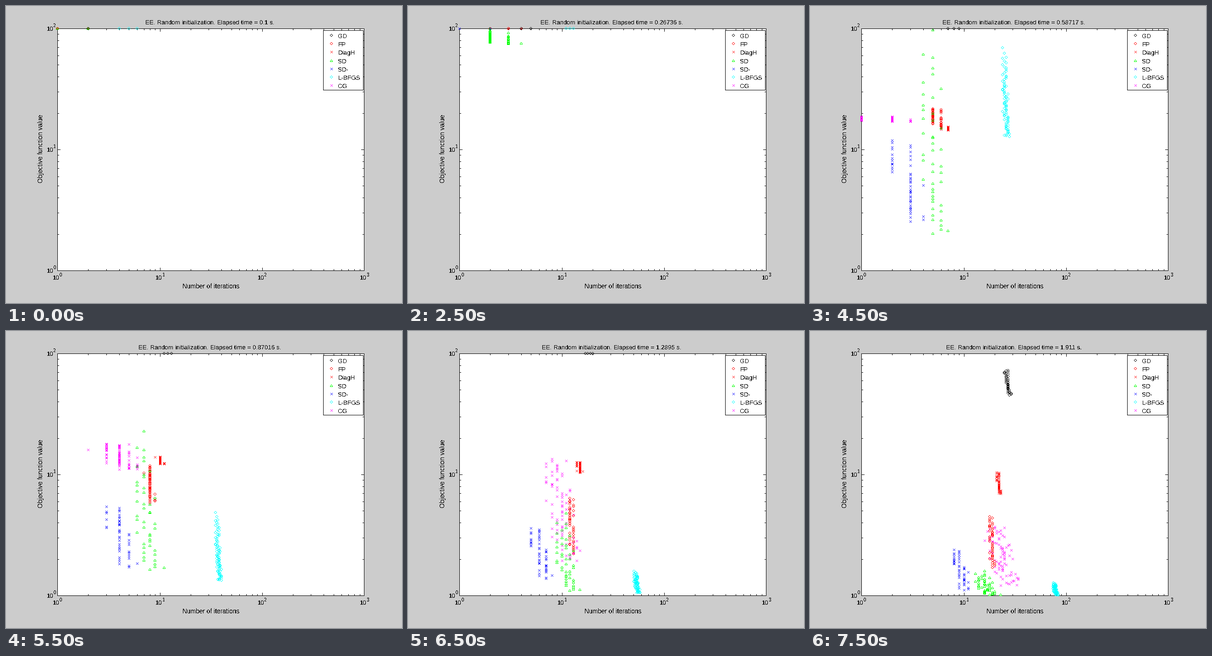
Write a matplotlib script that moves like this. It is 864 by 648 pixels and loops after 8 s.

```python
import numpy as np
import matplotlib.pyplot as plt
from matplotlib.animation import FuncAnimation
from matplotlib.collections import PolyCollection

W, H, DPI = 864, 648, 72
FRAMES, INTERVAL = 16, 500
LEFT, RIGHT, TOP, BOTTOM = 112, 781, 49, 577

plt.rcParams.update({"font.family": "Liberation Sans",
                     "text.antialiased": False})
fig = plt.figure(figsize=(W / DPI, H / DPI), dpi=DPI, facecolor="#cccccc")
ax = fig.add_axes([0, 0, 1, 1])
ax.set_xlim(0, W)
ax.set_ylim(H, 0)
ax.axis("off")


def px(n):
    return np.rint(112.3 + 223.2 * np.log10(n))


def py(v):
    return np.rint(BOTTOM - 264 * np.log10(v))


def box(x, y, w=1, h=1):
    return [(x, y), (x + w, y), (x + w, y + h), (x, y + h)]


def fill(boxes, color, z):
    polys = PolyCollection(boxes, facecolors=color, edgecolors="none",
                           linewidths=0, zorder=z)
    ax.add_collection(polys, autolim=False)
    return polys


def outline(x0, y0, x1, y1):
    w, h = x1 - x0 + 1, y1 - y0 + 1
    return [box(x0, y0, w), box(x0, y1, w),
            box(x0, y0, 1, h), box(x1, y0, 1, h)]


def label(x, y, s, size=13.33, **kw):
    return ax.text(x, y, s, fontsize=size, color="black", zorder=6, **kw)


# Crisp markers, built from unit cells around the centre
def stamp(rule):
    r = range(-3, 3)
    return np.array([box(i, j) for j in r for i in r if rule(i, j)], float)


CIRCLE = stamp(lambda i, j: abs(2 * i + 1) + abs(2 * j + 1) == 6)
CROSS = stamp(lambda i, j: abs(i) == abs(j) < 3)
TRIANGLE = stamp(lambda i, j: j == 2 or
                 (j > -3 and abs(2 * i + 1) == 2 * ((j + 3) // 2) + 1))


def place(marker, x, y):
    at = np.stack([x, y], axis=-1).reshape(-1, 1, 1, 2)
    return (at + marker).reshape(-1, 4, 2)


def elapsed(step):
    return 0.1 * 300 ** (step / 29)


class Series:
    """Runs of one method: iterations grow as a power of the elapsed time,
    values fall within a band given by (step, high, low) keys."""

    def __init__(self, name, marker, color, z, rate, power, spread, keys,
                 runs=45, skew=1, first=0):
        self.name, self.marker, self.color = name, marker, color
        self.rate, self.power, self.spread = rate, power, spread
        self.first = first
        self.steps, high, low = np.array(keys, float).T
        self.high, self.low = np.log(high), np.log(low)
        rng = np.random.default_rng(int(10 * z))
        rank = (np.arange(runs) + rng.random(runs)) / runs
        noise = np.clip(rng.normal(size=runs), -1.8, 1.8)
        self.depth = rank ** (1 / skew)
        self.pace = 0.6 * (2 * rank - 1) * 3 ** 0.5 + 0.8 * noise
        self.cloud = fill([], color, z)

    def draw(self, step):
        if step < self.first:
            self.cloud.set_verts([])
            return
        n = self.rate * elapsed(step) ** self.power
        n = n * np.exp(self.spread * self.pace) + 0.25 * self.pace
        high = np.interp(step, self.steps, self.high)
        low = np.interp(step, self.steps, self.low)
        v = np.exp(high + (low - high) * self.depth)
        x = px(np.maximum(np.rint(n), 1))
        self.cloud.set_verts(place(self.marker, x, py(v)))


series = [
    Series("GD", CIRCLE, "#000000", 3.1, 14.1, 1, 0.02,
           [(13, 100, 100), (15, 73, 45)], runs=36),
    Series("FP", CIRCLE, "#ff0000", 3.2, 9.5, 1.06, 0.02,
           [(5, 100, 100), (9, 21.7, 15.5), (13, 6.4, 2.2), (15, 4.5, 1.7)]),
    Series("DiagH", CROSS, "#ff0000", 3.3, 11.5, 1, 0.01,
           [(5, 100, 100), (9, 15.5, 14.4), (13, 12.7, 10.3),
            (15, 10.5, 6.9)]),
    Series("SD", TRIANGLE, "#00ff00", 3.4, 8.7, 1, 0.12,
           [(4, 100, 100), (5, 100, 75), (7, 98, 4), (9, 98, 1.95),
            (11, 23, 1.6), (13, 4.8, 1.08), (15, 1.6, 1.01)], skew=1.5),
    Series("SD-", CROSS, "#0000ff", 3.5, 4.9, 1, 0.07,
           [(5, 100, 100), (9, 12, 2.5), (11, 5.5, 1.7), (15, 2.4, 1.1)],
           first=2),
    Series("L-BFGS", CIRCLE, "#00ffff", 3.6, 42.5, 0.95, 0.03,
           [(7, 100, 100), (9, 72, 12.7), (11, 5, 1.33), (13, 1.6, 1.05),
            (15, 1.28, 1.01)], runs=80, skew=1.6),
    Series("CG", CROSS, "#ff00ff", 3.0, 5.6, 2.2, 0.16,
           [(9, 18.7, 17), (11, 18, 11), (13, 13.5, 1.9), (15, 3.7, 1.2)],
           runs=80, first=8),
]

# Axes
fill([box(LEFT, TOP, RIGHT - LEFT, BOTTOM - TOP)], "white", 1)
ink = outline(LEFT, TOP, RIGHT, BOTTOM)
for decade in range(3):
    for m in range(1, 10):
        size = 7 if m == 1 else 4
        x = px(m * 10 ** decade)
        ink += [box(x, TOP, 1, size), box(x, BOTTOM - size + 1, 1, size)]
        if decade < 2:
            y = py(m * 10 ** decade)
            ink += [box(LEFT, y, size), box(RIGHT - size + 1, y, size)]
fill(ink, "black", 2)


def power_label(x, y, e):
    label(x, y, "10")
    label(x + 15, y - 7.5, str(e), 10.5)


for e in range(4):
    power_label(px(10 ** e) - 10, 597, e)
for e in range(3):
    power_label(88.5, py(10 ** e) + 5, e)
label(447.5, 616, "Number of iterations", 13.7, ha="center")
label(80, 311.5, "Objective function value", 14, ha="center", va="baseline",
      rotation=90, rotation_mode="anchor")
title = label(444.5, 40, "", 13.4, ha="center")

# Legend
fill([box(692, 53, 88, 131)], "white", 4)
fill(outline(692, 53, 779, 183), "black", 5)
for i, s in enumerate(series):
    fill(place(s.marker, 710, round(64 + 18.2 * i)), s.color, 5)
    label(724.5, 70 + 18.2 * i, s.name)


def draw(step):
    title.set_text("EE. Random initialization. "
                   f"Elapsed time = {elapsed(step):.5g} s.")
    for s in series:
        s.draw(step)
    return [title] + [s.cloud for s in series]


anim = FuncAnimation(fig, draw, frames=FRAMES, interval=INTERVAL,
                     repeat=True, repeat_delay=0, blit=False)
plt.show()
```
